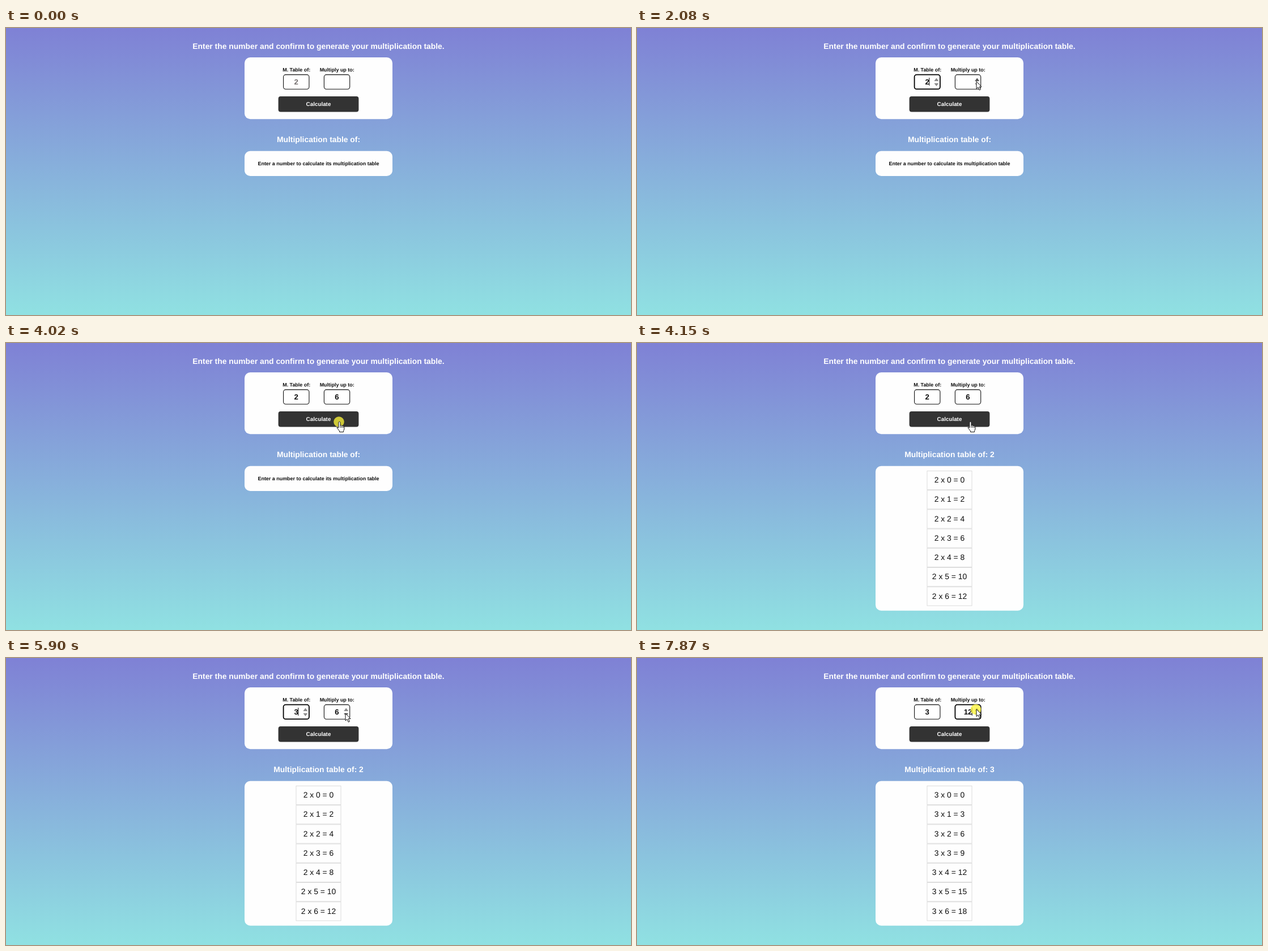
An HTML page for the animation above (8 s loop, 1103 by 508 pixels).

```html
<!DOCTYPE html>
<html lang="en">
<head>
<meta charset="utf-8">
<title>Multiplication table</title>
<style>
html, body { margin: 0; width: 100%; height: 100%; overflow: hidden; }
body { background: linear-gradient(#7f81d5, #90e1e2); }
svg { display: block; width: 1103px; height: 508px; }
text {
  font: bold 8.95px "Liberation Sans", Arial, sans-serif;
  text-anchor: middle; text-rendering: geometricPrecision; fill: #0c0c0c;
}
.head { font-size: 13.87px; fill: #fff; }
.digit { font-size: 13.2px; }
.digit.placeholder { fill: #757070; }
.row text { font-size: 13.87px; font-weight: normal; }
.row rect { fill: none; stroke: #dcdcdc; }
.card { fill: #fefefe; }
.box { fill: #fff; stroke: #111; stroke-width: 1.1; }
.box.focused { stroke: #000; stroke-width: 1.8; }
.arrows { fill: #8b8b8b; }
.press { fill: #fbf43a; opacity: .78; }
.pointer path { fill: #fff; stroke: #111; stroke-linejoin: round; }
</style>
</head>
<body>
<svg viewBox="0 0 1103 508" xmlns="http://www.w3.org/2000/svg">
  <text class="head" x="551.5" y="36.9">Enter the number and confirm to generate your multiplication table.</text>
  <rect class="card" x="421" y="52" width="261" height="109.3" rx="10"/>
  <text x="512.7" y="76.6">M. Table of:</text>
  <text x="584.2" y="76.6">Multiply up to:</text>
  <g id="fields"></g>
  <rect x="480.6" y="121" width="141.8" height="27.4" rx="4" fill="#333"/>
  <text x="551.5" y="137.7" style="font-size:9.85px;fill:#fff">Calculate</text>
  <text class="head" id="heading" x="551.5" y="202.4"></text>
  <rect class="card" id="result" x="421" y="217.8" width="261" rx="10"/>
  <text id="hint" x="551.5" y="243">Enter a number to calculate its multiplication table</text>
  <g id="table"></g>
  <circle class="press" id="press" r="9.3"/>
  <g class="pointer" id="pointer">
    <path id="arrow" d="M0 0V13L3 10.3 5.2 15.4 7.4 14.4 5.2 9.5H9Z"/>
    <path id="hand" d="M-1.6 1.3Q0-1 1.5 1.3V7Q3 5.8 4.2 7.4 5.6 6.5 6.6 8 8 7.4 8.4 9V13Q8 15.5 7 16.5V18.5H0V16.8L-4.6 10.8Q-4 9-1.6 11.2ZM1.5 7V11M4.2 7.6V11M6.6 8.4V11"/>
  </g>
</svg>
<script>
const LOOP = 8000;
const APPEAR = 70;
const CALC_DELAY = 60;
const TABLE_OF = 0, UP_TO = 1, CALCULATE = 2;

// A series of evenly spaced clicks on one control
const clicks = (target, start, count = 1, gap = 0, hold = 120) =>
  Array.from({ length: count }, (_, i) => ({ target, time: start + i * gap, hold }));

const events = [
  clicks(TABLE_OF, 1470, 2, 140),
  clicks(UP_TO, 2280, 5, 217),
  clicks(UP_TO, 3540),
  clicks(CALCULATE, 4020),
  clicks(TABLE_OF, 5620),
  clicks(CALCULATE, 6250),
  clicks(UP_TO, 6980, 6, 164, 200)
].flat();

const leftSpin = { x: 528.3, y: 89 };
const rightSpin = { x: 599, y: 90.5 };
const button = { x: 588.5, y: 139 };
const below = (spot, dy) => ({ x: spot.x, y: spot.y + dy });

const entry = { x: 1062, y: 501 };
const moves = [
  { from: APPEAR, until: 810, to: leftSpin },
  { from: 1740, until: 2080, to: below(rightSpin, 4) },
  { from: 2210, until: 2280, to: rightSpin },
  { from: 3610, until: 4010, to: button },
  { from: 4680, until: 5480, to: leftSpin },
  { from: 5690, until: 5900, to: below(rightSpin, 7.5) },
  { from: 5920, until: 6180, to: below(button, -10) },
  { from: 6450, until: 6780, to: rightSpin }
];

const $ = id => document.getElementById(id);
const show = (el, on) => el.style.display = on ? "" : "none";

function make(parent, tag, attrs) {
  const el = document.createElementNS("http://www.w3.org/2000/svg", tag);
  for (const name in attrs) el.setAttribute(name, attrs[name]);
  return parent.appendChild(el);
}

function makeField(cx) {
  const g = $("fields");
  const spin = cx + 16.2;
  const box = make(g, "rect", { x: cx - 22.6, y: 82.6, width: 45.3, height: 25.6, rx: 4 });
  const digit = make(g, "text", { x: cx, y: 99.6 });
  const caret = make(g, "rect", { y: 88, width: 1, height: 14 });
  const arrows = make(g, "g", { class: "arrows" });
  const up = make(arrows, "path", { d: `M${spin - 4} 94l4-5.4 4 5.4Z` });
  const down = make(arrows, "path", { d: `M${spin - 4} 97.7l4 5.4 4-5.4Z` });
  return { cx, box, digit, caret, arrows, up, down };
}

const fields = [makeField(512.2), makeField(584)];
const rows = Array.from({ length: 7 }, (_, i) => {
  const g = make($("table"), "g", { class: "row" });
  const y = 226 + i * 34.23;
  make(g, "rect", { x: 512, y: y + .4, width: 79, height: 33.2 });
  return make(g, "text", { x: 551.5, y: y + 21.2 });
});

function pointerAt(t) {
  let { x, y } = entry;
  for (const { from, until, to } of moves) {
    const p = Math.min(1, Math.max(0, (t - from) / (until - from)));
    const eased = p * p * (3 - 2 * p);
    x += (to.x - x) * eased;
    y += (to.y - y) * eased;
  }
  return { x, y };
}

// Each click on a spinner adds one, so a value is a count of clicks
const valueAt = (target, t) =>
  events.filter(e => e.target === target && e.time <= t).length;

function drawField(field, value, placeholder, focused, { x, y }) {
  const { cx, box, digit, caret, arrows, up, down } = field;
  const hover = Math.abs(x - cx) < 23 && y > 82 && y < 108.5;
  const onSpin = hover && x > cx + 11;
  const label = String(value || placeholder);
  box.setAttribute("class", focused ? "box focused" : "box");
  digit.setAttribute("class", value ? "digit" : "digit placeholder");
  digit.textContent = label;
  caret.setAttribute("x", cx + label.length * 3.67 - .6);
  show(caret, focused);
  show(arrows, hover || focused);
  up.style.fill = onSpin && y < 95.5 ? "#555" : "";
  down.style.fill = onSpin && y >= 95.5 ? "#555" : "";
}

function drawTable(n) {
  $("heading").textContent = "Multiplication table of:" + (n ? " " + n : "");
  $("result").setAttribute("height", n ? 256 : 44.2);
  show($("hint"), !n);
  show($("table"), n);
  rows.forEach((row, i) => row.textContent = `${n} x ${i} = ${n * i}`);
}

function drawPointer({ x, y }, t, pressed) {
  const onButton = Math.abs(x - 551.5) < 71 && y > 121 && y < 148.4;
  show($("arrow"), !onButton);
  show($("hand"), onButton);
  show($("pointer"), t >= APPEAR);
  $("pointer").setAttribute("transform", `translate(${x} ${y})`);
  show($("press"), pressed);
  $("press").setAttribute("cx", x - 1);
  $("press").setAttribute("cy", y + .5);
}

function draw(t) {
  const pointer = pointerAt(t);
  const last = events.findLast(e => e.time <= t);
  const calculated = events.findLast(e => e.target === CALCULATE && e.time + CALC_DELAY <= t);
  fields.forEach((field, i) =>
    drawField(field, valueAt(i, t), i === TABLE_OF ? 2 : "", last?.target === i, pointer));
  drawTable(calculated ? valueAt(TABLE_OF, calculated.time) : 0);
  drawPointer(pointer, t, last && t < last.time + last.hold);
}

const origin = performance.now();
function tick() {
  draw((performance.now() - origin) % LOOP);
  requestAnimationFrame(tick);
}
draw(0);
requestAnimationFrame(tick);
</script>
</body>
</html>
```
